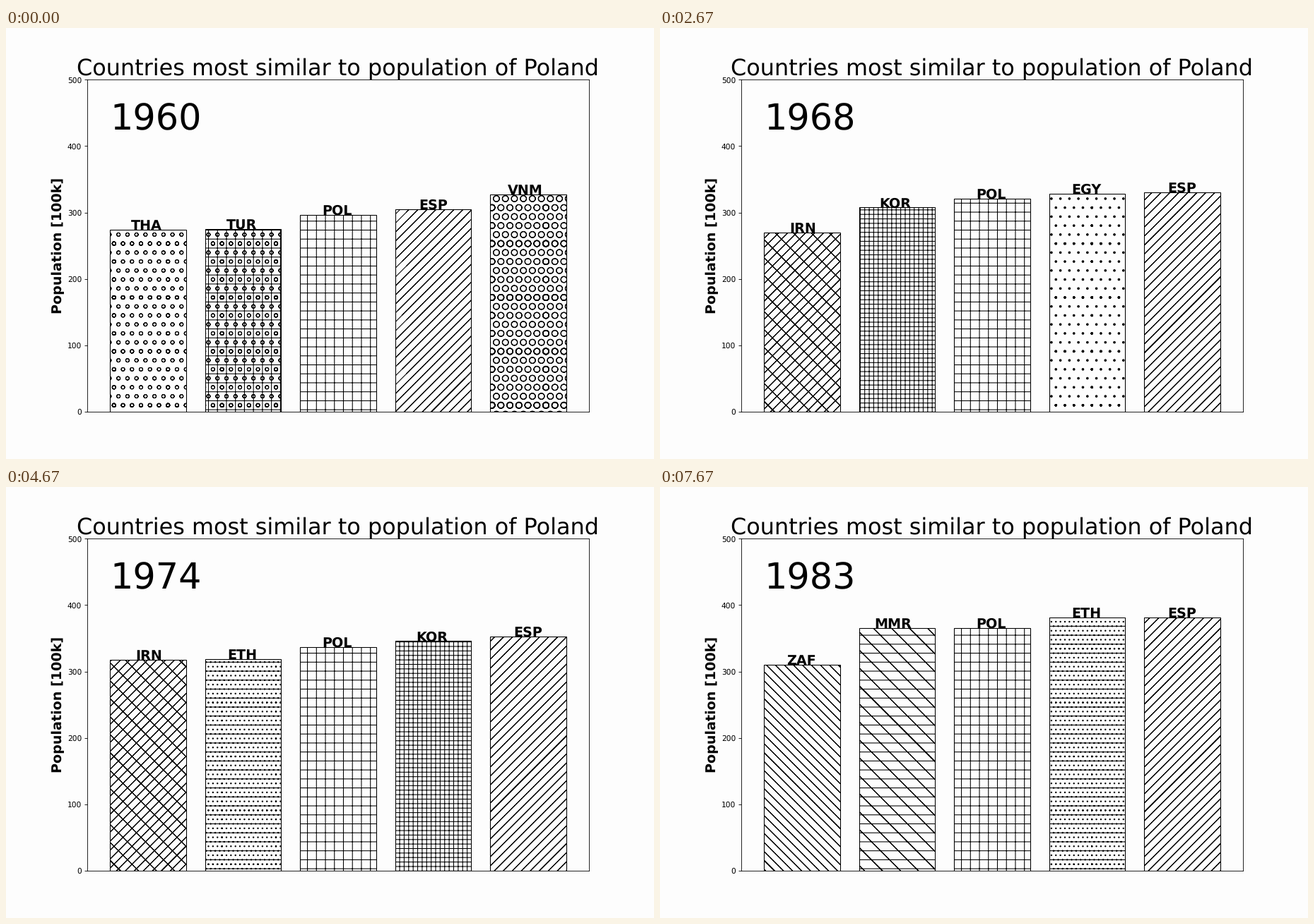
Recreate the animation shown at these times as a matplotlib script. Size 917 by 611 pixels, loop 8000 ms.

```python
import matplotlib.pyplot as plt
import numpy as np
from matplotlib.animation import FuncAnimation
from matplotlib.hatch import get_path
from matplotlib.patches import PathPatch, Rectangle
from matplotlib.path import Path

WIDTH, HEIGHT, DPI = 917, 611, 76.4
FIRST_YEAR, LAST_YEAR = 1960, 1983
FRAMES, INTERVAL_MS = 80, 100
PAPER = "#fdfdfd"
BAR_WIDTH = 0.8

plt.rcParams.update({"font.family": "DejaVu Sans", "text.hinting": "none"})

# Hatch, population (in 100k) in the first and last year, and the years
# where the growth rate turns.
COUNTRIES = {
    "POL": ("+", 296.4, 365.7, {1964: 311.4, 1971: 327.9}),
    "ESP": ("//", 304.6, 381.7, {1966: 322.9, 1978: 368.8}),
    "TUR": ("+o", 274.7, 476, {}),
    "THA": ("o", 274, 540, {}),
    "VNM": ("O", 326.7, 646, {}),
    "KOR": ("++", 250, 402, {1966: 294.4, 1971: 328.8}),
    "EGY": (".", 269, 477, {}),
    "PHL": ("*|", 264.7, 540, {}),
    "IRN": ("x/", 217, 423, {1974: 317.9}),
    "ETH": ("-..", 214, 381.4, {1974: 318.6, 1979: 344.9}),
    "MMR": ("-\\", 219, 365, {}),
    "ZAF": ("\\\\", 171, 310.1, {}),
}

fig = plt.figure(figsize=((WIDTH + 1e-6) / DPI, (HEIGHT + 1e-6) / DPI),
                 dpi=DPI, facecolor=PAPER)
ax = fig.add_axes([0.125, 0.11, 0.775, 0.77], facecolor=PAPER)
ax.set_xlim(-0.64, 4.64)
ax.set_ylim(0, 500)
ax.set_xticks([])
ax.set_title("Countries most similar to population of Poland", fontsize=30,
             pad=6.5)
ax.set_ylabel("Population [100k]", fontsize=18, fontweight="bold")
year_text = ax.text(-0.4, 425, "", fontsize=48)
drawn = []


def population(name, year):
    """Steady percentage growth between the turning points."""
    _, first, last, turns = COUNTRIES[name]
    points = {FIRST_YEAR: first, **turns, LAST_YEAR: last}
    return np.exp(np.interp(year, list(points), np.log(list(points.values()))))


def ranking(year):
    """Poland with its two nearest neighbours below and above."""
    size = {name: population(name, year) for name in COUNTRIES}
    order = sorted(size, key=size.get)
    middle = order.index("POL")
    return [(name, size[name]) for name in order[middle - 2:middle + 3]]


def hatch_path(pattern, bar):
    """One-inch hatch tiles, laid from the top left corner, behind one bar."""
    tile = get_path(pattern, 6)
    box = ax.transData.transform_bbox(bar.get_bbox())
    left, right = box.x0 / DPI, box.x1 / DPI
    top, bottom = (HEIGHT - box.y1) / DPI, (HEIGHT - box.y0) / DPI
    tiles = [Path(tile.vertices + (col, HEIGHT / DPI - 1 - row), tile.codes)
             for col in range(int(left), int(right) + 1)
             for row in range(int(top) - 1, int(bottom) + 2)]
    return Path.make_compound_path(*tiles)


def draw_bar(slot, name, value):
    bar = ax.add_patch(Rectangle((slot - BAR_WIDTH / 2, 0), BAR_WIDTH, value,
                                 facecolor=PAPER, edgecolor="black", lw=1))
    hatch = PathPatch(hatch_path(COUNTRIES[name][0], bar), color="black",
                      lw=1, capstyle="butt", snap=False, zorder=1.5,
                      transform=fig.dpi_scale_trans)
    ax.add_artist(hatch)
    hatch.set_clip_path(bar)
    label = ax.text(slot + 0.15, value, name, ha="right", fontsize=18,
                    fontweight="bold")
    drawn.extend([bar, hatch, label])


def update(frame):
    # Ten frames hold three years, as three, three and four frames.
    year = FIRST_YEAR + (3 * frame + 2) // 10
    if year_text.get_text() != str(year):
        while drawn:
            drawn.pop().remove()
        year_text.set_text(str(year))
        for slot, (name, value) in enumerate(ranking(year)):
            draw_bar(slot, name, value)
    return [year_text, *drawn]


anim = FuncAnimation(fig, update, frames=FRAMES, interval=INTERVAL_MS,
                     init_func=lambda: update(0), repeat=True, repeat_delay=0)
plt.show()
```
